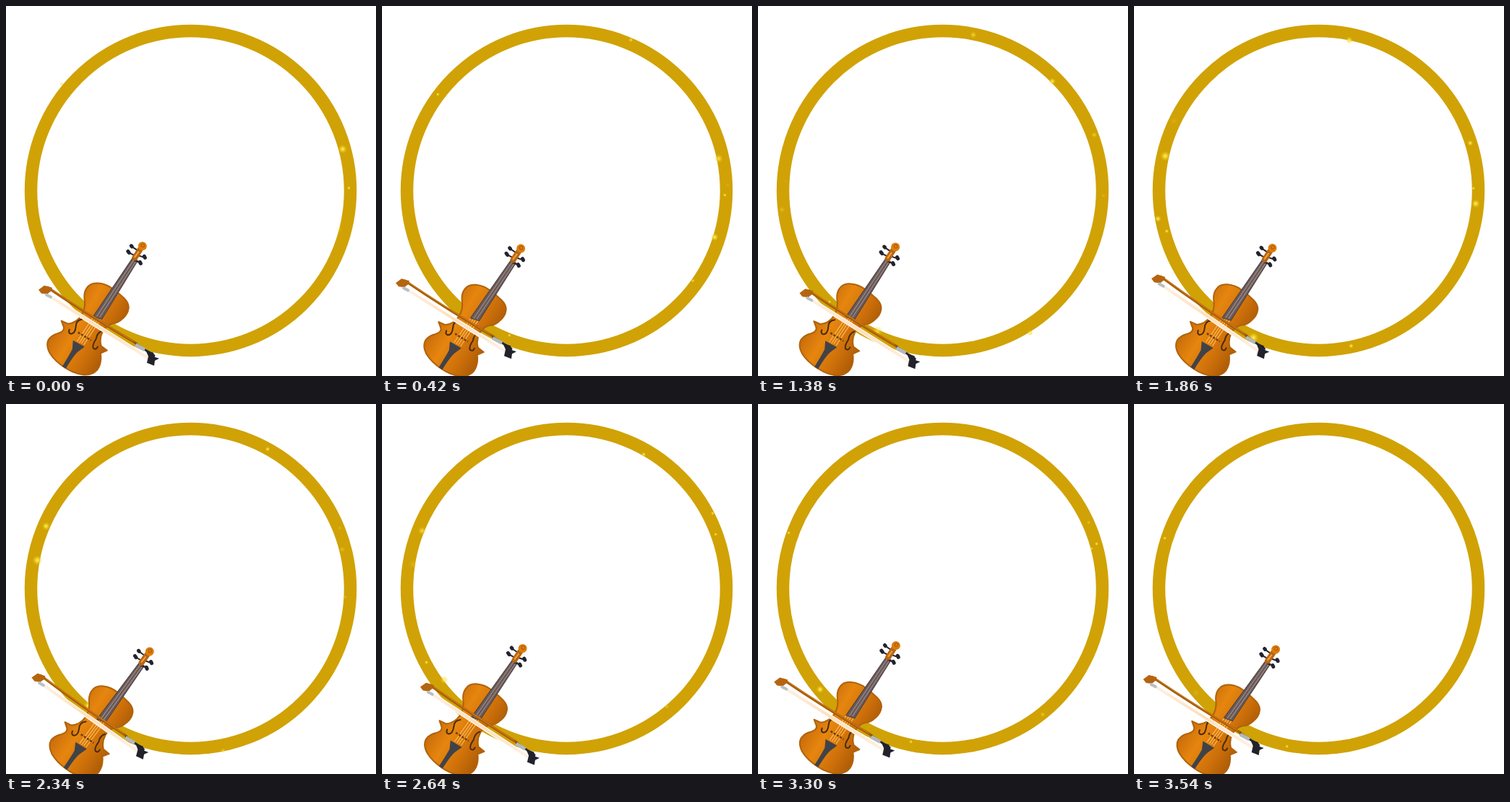
An HTML page for the animation above (3.6 s loop, 512 px wide and 512 px high).

```html
<!DOCTYPE html>
<html lang="en">
<head>
<meta charset="utf-8">
<title>Violin in a golden ring</title>
<style>
  html, body { margin: 0; width: 100%; height: 100%; overflow: hidden; background: #fff; }
  svg { display: block; width: 100vw; height: 100vh; }
</style>
</head>
<body>
<svg viewBox="0 0 512 512" fill="none" stroke-linecap="round" stroke-linejoin="round">
  <defs>
    <radialGradient id="glow">
      <stop offset="0" stop-color="#fff27c"/>
      <stop offset=".35" stop-color="#fbe034" stop-opacity=".75"/>
      <stop offset="1" stop-color="#eac614" stop-opacity="0"/>
    </radialGradient>
    <linearGradient id="wood" gradientUnits="userSpaceOnUse" x1="66" y1="448" x2="144" y2="494">
      <stop offset="0" stop-color="#c86c0a"/>
      <stop offset=".3" stop-color="#e6860f"/>
      <stop offset=".6" stop-color="#d0720a"/>
      <stop offset="1" stop-color="#a05306"/>
    </linearGradient>
    <linearGradient id="hair" gradientUnits="userSpaceOnUse" x1="56" y1="400" x2="196" y2="487">
      <stop offset="0" stop-color="#fff0e4"/>
      <stop offset=".5" stop-color="#ffdfba"/>
      <stop offset="1" stop-color="#fff0e4"/>
    </linearGradient>
  </defs>

  <circle cx="255.5" cy="255.5" r="221" stroke="#d0a206" stroke-width="17.5"/>
  <g id="sparkles" fill="url(#glow)"></g>

  <g id="violin">
    <path fill="url(#wood)" stroke="#b0620a" stroke-width="2" d="M112 391Q117 383 128 384Q139 385 147 391Q157 398 164 405
      Q171 412 170 419Q169 427 162 433Q155 440 148 440Q139 442 134 451Q129 461 132 471L140 477L131 481Q133 494 127 503
      Q121 511 108 511Q94 509 82 501Q68 492 61 481Q55 470 59 462Q64 455 73 453Q82 450 80 444L77 436L86 440
      Q98 439 105 428Q111 418 109 406Q108 397 112 391Z"/>
    <path stroke="#ffc363" d="M99 464L123 428M102 466L126 430M105 467L129 431M108 469L132 433"/>
    <path stroke="#4a2b0c" stroke-width="2" d="M106 434Q97 435 97 444Q96 454 90 454Q86 453 88 448
      M133 450Q126 453 125 461Q119 470 121 474Q125 477 127 472"/>
    <path stroke="#6f3c0c" stroke-width="2.5" stroke-dasharray="3 2" stroke-linecap="butt" d="M100 452L118 463"/>
    <path fill="#414248" d="M93 463L109 472L101 478Q95 482 83 502L78 499Q88 483 92 475Z"/>
    <path fill="#695a59" stroke="#4c3f40" d="M121 430L176 349L183 353L133 434Z"/>
    <path stroke="#a39490" d="M126 430L178 351M130 431L181 353"/>
    <path stroke="#23232f" stroke-width="2" d="M174 333L183 339M169 341L179 346M184 346L193 349M179 353L187 356"/>
    <path stroke="#23232f" stroke-width="5" d="M174 332.5L175 333.5M169.5 340L171 342M192 347L193 349M186 355L187 357"/>
    <path stroke="#b96512" stroke-width="8" d="M179 349L186 338"/>
    <path stroke="#f0a340" stroke-width="2" d="M179 348L184 341"/>
    <circle cx="189.5" cy="333" r="6" fill="#dc7d0c"/>
    <circle cx="190" cy="332" r="2.3" stroke="#a95a08"/>
  </g>

  <g id="bow">
    <path stroke="#fff" stroke-width="6" d="M57 400L194 486"/>
    <path stroke="url(#hair)" stroke-width="4" d="M57 400L194 486"/>
    <path stroke="#a85b08" stroke-width="3.5" d="M56 389Q112 427 178 466"/>
    <path stroke="#d4861f" d="M62 392Q114 427 174 463"/>
    <path fill="#b5650f" d="M43 392L51 386L62 389L60 394L55 398L47 397Z"/>
    <path stroke="#b9c0c4" stroke-width="4" d="M54 399L60 402"/>
    <path stroke="#30313a" stroke-width="3" d="M178 467L203 483"/>
    <path stroke="#b4b8ba" stroke-width="5" stroke-linecap="butt" d="M177 468L190 475"/>
    <path fill="#22222c" d="M191 475L202 479L204 485L210 487L204 490L203 497L193 493L195 484Z"/>
  </g>
</svg>
<script>
const LOOP = 3600, STEP = 60, PLAYING = 2940, SWAY = PLAYING / 2;
const { PI, cos, sin, abs, min, max } = Math;

// where the bow changes direction: time, shift in x
const turns = [[-280, 10], [680, -31], [1400, 14.5], [2020, -25], [2660, 10], [3620, -31]];

const byId = id => document.getElementById(id);
const violin = byId('violin'), bow = byId('bow');

let seed = 11;
function random(from, to) {
  seed = (seed * 16807) % 2147483647;
  return from + (to - from) * seed / 2147483647;
}

// each sparkle sinks slowly across the ring while it fades in and out
const sparkles = Array.from({ length: 36 }, () => {
  const dot = document.createElementNS('http://www.w3.org/2000/svg', 'circle');
  const angle = random(0, 2 * PI), radius = random(214, 225);
  dot.setAttribute('cx', 255.5 + radius * cos(angle));
  dot.setAttribute('r', 2.5 + 5 * random(0, 1) ** 3);
  byId('sparkles').append(dot);
  return {
    dot, y: 255.5 + radius * sin(angle),
    mid: random(0, LOOP), half: random(300, 700), fall: random(.015, .035)
  };
});

function bowShift(t) {
  const i = turns.findIndex(([time]) => time > t);
  const [t0, x0] = turns[i - 1], [t1, x1] = turns[i];
  return x0 + (x1 - x0) * (1 - cos(PI * (t - t0) / (t1 - t0))) / 2;
}

function draw(time) {
  const t = time % PLAYING;
  const sway = 1.16 + 1.54 * cos(2 * PI * (t - 850) / SWAY);
  const dx = bowShift(t);
  // the second stroke tilts the bow and lifts it
  const tilt = t > 1400 ? 3.4 * sin(PI * (t - 1400) / (PLAYING - 1400)) ** 2 : 0;
  const dy = .36 * dx - 3.6 * tilt;
  violin.setAttribute('transform', `rotate(${sway} -8 535)`);
  bow.setAttribute('transform', `translate(${dx} ${dy}) rotate(${tilt} 44 391)`);

  for (const { dot, y, mid, half, fall } of sparkles) {
    const age = time - mid;
    dot.setAttribute('cy', y + fall * age);
    dot.setAttribute('opacity', max(0, min(1, 2 - 2 * abs(age) / half)));
  }
}

const start = performance.now();
function tick() {
  const t = (performance.now() - start) % LOOP;
  draw(Math.floor(t / STEP) * STEP);
  requestAnimationFrame(tick);
}
tick();
</script>
</body>
</html>
```
